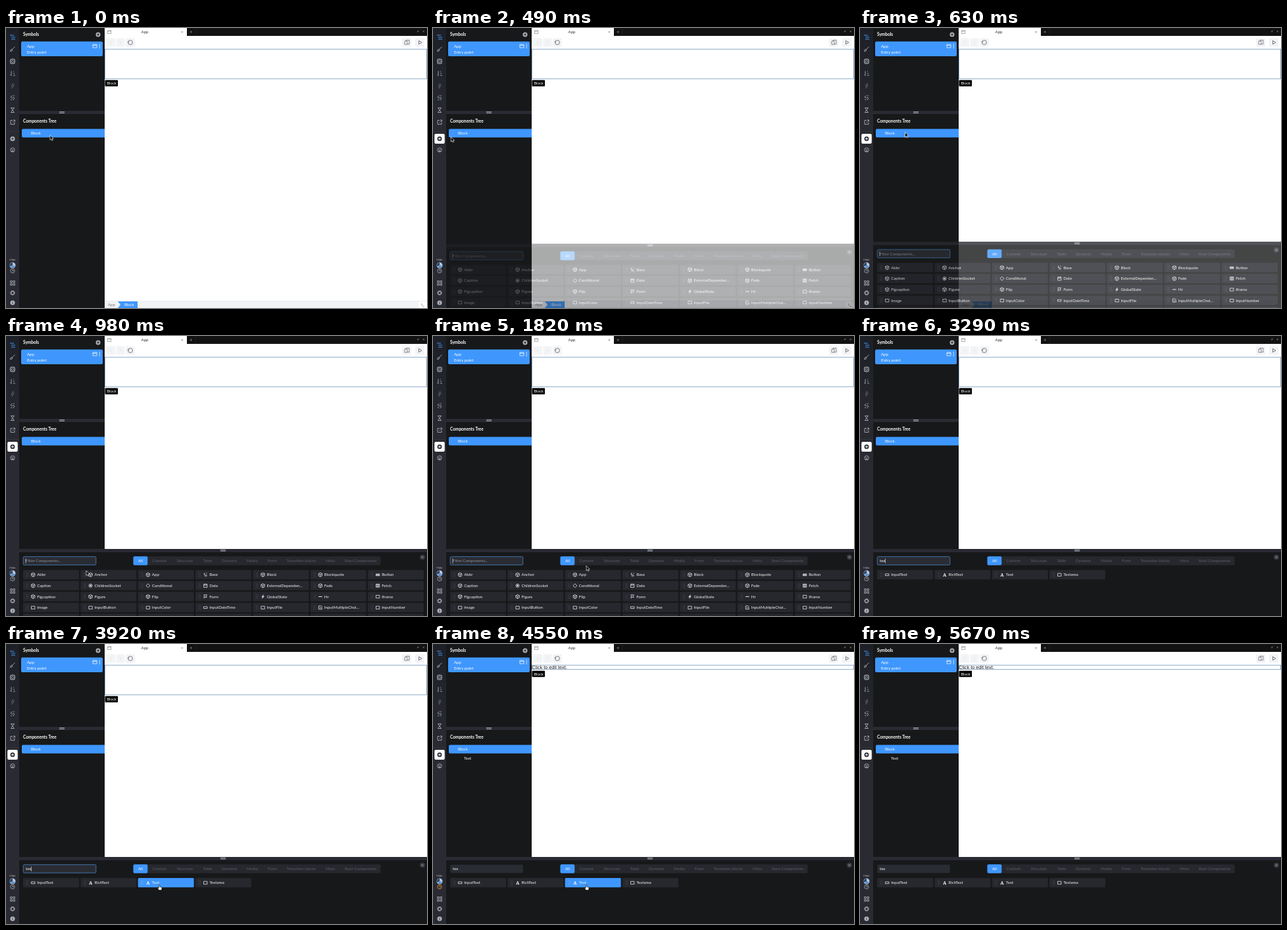
These frames come from a looping animation (640x426 px, 5.88 s). An HTML page:

```html
<!DOCTYPE html>
<html lang="en">
<head>
<meta charset="utf-8">
<title>Component editor</title>
<style>
html, body { margin: 0; height: 100%; overflow: hidden; background: #171819 }
svg { display: block; width: 100vw; height: 100vh }
text { font-family: Lato, "Open Sans", sans-serif; font-size: 6.1px; white-space: pre }
</style>
</head>
<body>
<svg id="stage" viewBox="0 0 640 426">
  <defs>
    <linearGradient id="rail" x2="0" y2="1">
      <stop stop-color="#1e2027"/><stop offset=".38" stop-color="#292a32"/>
    </linearGradient>
  </defs>
  <g id="base"></g><g id="live"></g><g id="panel"></g><g id="pointer"></g>
</svg>
<script>
const LOOP = 5880, STEP = 70, OPEN = 420, DROP = 4340;
const BLUE = '#3f97fd', DARK = '#171819', RAIL = '#292a32', CARD = '#26282e', DIM = '#b2b4bb';
const $ = id => document.getElementById(id);

const rect = (x, y, w, h, fill, r = 0, more = '') =>
  `<rect x="${x}" y="${y}" width="${w}" height="${h}" fill="${fill}" rx="${r}" ${more}/>`;
const text = (x, y, s, fill = '#fff', more = '') => `<text x="${x}" y="${y}" fill="${fill}" ${more}>${s}</text>`;
const line = (d, color = '#d9dade', w = .85, fill = 'none', more = '') =>
  `<path d="${d}" stroke="${color}" stroke-width="${w}" fill="${fill}" stroke-linejoin="round" ${more}/>`;
const disc = (x, y, r, fill, more = '') => `<circle cx="${x}" cy="${y}" r="${r}" fill="${fill}" ${more}/>`;
const ring = (x, y, r, color = '#d9dade', w = .8) => disc(x, y, r, 'none', `stroke="${color}" stroke-width="${w}"`);
const at = (x, y, s) => `<g transform="translate(${x} ${y})">${s}</g>`;
const plus = (x, y, r, fill, ink) => disc(x, y, r, fill) + line(`M${x - 2} ${y}h4M${x} ${y - 2}v4`, ink, .9);
const grip = (x, y) => line(`M${x - 4} ${y - .9}h8M${x - 4} ${y + .9}h8`, DIM, .9);

// icons centred on 0,0
const icon = {
  cube: line('M0-3L2.7-1.6V1.6L0 3L-2.7 1.6V-1.6ZM-2.7-1.6L0-.2L2.7-1.6M0-.2V3'),
  bolt: line('M-1.5-3L-2 0H0L-.6 3M1-3L2.4-1.5M.6 0L2.2 1.2L1 3'),
  target: ring(0, 0, 2.6) + disc(0, 0, 1.5, '#d9dade'),
  diamond: line('M0-3L3 0L0 3L-3 0Z'),
  date: line('M-2.6-2.2H2.6V2.6H-2.6ZM-2.6-.8H2.6M-1.3-3V-2M1.3-3V-2'),
  table: line('M-2.6-2.4H2.6V2.4H-2.6ZM-2.6-1.6H2.6M-2.6 .6H2.6M0-1.6V2.4'),
  box: line('M-2.7-2H2.7V2.2H-2.7Z'),
  wide: line('M-2.8-1.3H2.8V1.4H-2.8Z'),
  button: line('M-2.7-1.2H2.7V1.5H-2.7Z', '#d9dade', .8, '#a5a7ae'),
  form: line('M-2-3V3M-2-2.6H2.4L.8-.9L2.2 .9H-2'),
  state: line('M1-2.8L-2 .4H0L-1 2.8L2-.4H0Z', '#d9dade', .5, '#d9dade'),
  dash: line('M-2.8 0H2.8', '#d9dade', 1.1),
  check: line('M2.5 0V2.5H-2.5V-2.5H1.5M-1.2-.3L0 1L2.8-2'),
  A: text(-2.6, 2.5, 'A', '#fff', 'style="font:bold 7px \'Noto Serif\',serif"')
};

const parts = `Abbr Anchor App Base:bolt Block Blockquote Button:button
Caption ChildrenSocket:target Conditional:diamond Date:date ExternalDependen... Fade Fetch:table
Figcaption Figure Flip Form:form GlobalState:state Hr:dash Iframe:box
Image:box InputButton:box InputColor:box InputDateTime:wide InputFile:box InputMultipleChoi...:check InputNumber:box
InputText:wide List Option RichText:A Select:box Text:A Textarea:box`
  .split(/\s+/).map(s => s.match(/^(.*?)(?::(\w+))?$/).slice(1));

const tabs = [['Content', 222.5], ['Structure', 259.5], ['Table', 299.5], ['Dynamic', 328], ['Media', 366],
  ['Form', 398], ['Transition blocks', 426.5], ['Meta', 486], ['Root Components', 515]];

// pointer stops: time, x, y
const stops = [[0, 67, 163], [70, 67, 163], [280, 11, 168], [420, 13, 168], [630, 68.5, 158.7], [980, 122, 357],
  [1260, 205, 366], [1470, 310, 377], [1820, 233, 349.5], [1960, 233, 349.5], [2030, 300, 348], [2170, 236, 352],
  [3430, 236, 352], [3850, 233, 366.5], [4830, 233, 366.5], [5180, 236, 408]];

function pointerAt(t) {
  const i = stops.findIndex(s => s[0] > t);
  if (i < 0) return stops.at(-1).slice(1);
  const [t0, x0, y0] = stops[i - 1], [t1, x1, y1] = stops[i];
  let u = (t - t0) / (t1 - t0);
  u = u * u * (3 - 2 * u);
  return [x0 + (x1 - x0) * u, y0 + (y1 - y0) * u];
}

function drawBase() {
  const w = DIM;
  const bold = 'style="font-weight:bold;font-size:6.5px"';
  return rect(0, 0, 640, 426, DARK) + rect(0, 0, 20, 426, 'url(#rail)')
    + line('M0 157.5H20', '#3a3c45', .6)
    // rail icons
    + line('M6 11H12M8 14H14M8 17H14', BLUE, 1.1)
    + line('M13.5 28.5L9.5 32.5M9 32L7 33.5L6.5 35.5L9 35L10 33Z', w)
    + line('M7 47.5H13V54H7Z', w) + ring(10, 50.7, 1.6, w) + ring(10, 50.7, 3.8, w, .6)
    + line('M8 65.5V72.5L6.5 71M11 66H12M11 69H13M11 72H14', w)
    + line('M11 84L8 88.5H10L9 92L12.5 87H10.3Z', '#6a6c75', .7)
    + line('M9.5 102.5L7 105L10 107M10 105L13 107L10.5 110M7 109H9M11 103H13', w)
    + line('M7.2 121.5H12.8M7.2 128.5H12.8M8 121.5C8 124 12 126 12 128.5M12 121.5C12 124 8 126 8 128.5', w)
    + line('M10 140.5H7V146.5H13V143.5M9.8 143.8L13.3 140.3M11 140H13.5V142.5', w)
    + ring(10, 185.5, 3.3, w) + line('M8 184.5L10 185.5L12 184.5M10 185.5V188M8 187.5H12', w, .7)
    + text(10, 353.5, 'Hide', w, 'text-anchor="middle" style="font-size:4.6px"')
    + disc(10, 361, 4.5, '#b9c6d8') + line('M10 361V357A4 4 0 0 0 6.2 362.5Z', '#294a70', .3, '#294a70')
    + line('M10 361L13.7 362.5A4 4 0 0 1 7.4 364Z', '#5b93d2', .3, '#5b93d2')
    + line('M6.7 384.7H9.2V387.2H6.7ZM10.9 384.7H13.4V387.2H10.9ZM6.7 388.9H9.2V391.4H6.7ZM10.9 388.9H13.4V391.4H10.9Z', w)
    + ring(10, 403, 2.4, w, 1.1) + disc(10, 403, 3.4, 'none', `stroke="${w}" stroke-width=".9" stroke-dasharray="1.3 1.37"`)
    + disc(10, 418, 3.5, w) + line('M10 417.3V420M10 415.6V416.4', RAIL, 1)
    // side panel
    + text(26, 12.3, 'Symbols', '#fff', bold) + plus(140, 10, 3.5, DIM, DARK)
    + rect(23, 20.4, 124, 22.6, BLUE, 2) + text(32, 30, 'App') + text(32, 38.6, 'Entry point')
    + line('M132 25H138V30H132ZM132 26.4H138', '#fff', .7)
    + [25, 27.5, 30].map(y => disc(142.3, y, .75, '#fff')).join('')
    + rect(20, 126, 130, 5, RAIL) + grip(85, 128.5)
    + text(26, 144.4, 'Components Tree', '#fff', bold)
    + `<path d="M150 153.5H26a2 2 0 0 0-2 2v9a2 2 0 0 0 2 2H150Z" fill="${BLUE}"/>`
    + text(38, 162.2, 'Block')
    // tab bar and toolbar
    + rect(150, 0, 490, 426, '#fff') + rect(275, 0, 365, 12, '#121213')
    + line('M288 0V12', '#2a2a2d', .6)
    + line('M154.5 3.7H159.7V8.5H154.5ZM154.5 5H159.7', '#777', .6)
    + text(211, 8, 'App', '#333', 'text-anchor="middle"')
    + line('M266.5 4.8L269 7.3M269 4.8L266.5 7.3', '#777', .7) + line('M279.5 6H283.1M281.3 4.2V7.8', '#888', .7)
    + line('M625.5 5.5L628 4M626 4V6.5M633.5 4L636 6.5M636 4L633.5 6.5', '#888', .7)
    + [[153, 13], [167.5, 13], [182, 14], [602, 14], [622, 14]].map(([x, n]) => rect(x, 15.5, n, 13, '#f3f4f6', 1.5)).join('')
    + line('M161 19.5L158 22L161 24.5M172.5 19.5L175.5 22L172.5 24.5', '#e4e6e9')
    + ring(189, 22, 3.4, '#5a5c62') + line('M185 20L185.8 22L187.4 20.8', '#5a5c62', .6)
    + line('M606 20H610V25H606ZM608 20V18.5H613V24.5H610', '#5a5c62', .7)
    + line('M627.5 19.3L632 22L627.5 24.7Z', '#5a5c62')
    // breadcrumbs
    + rect(150, 415.5, 490, 10.5, '#f1f3f5') + line('M150 415.5H640', '#dde1e5', .6)
    + text(155, 423.2, 'App', '#777')
    + `<path d="M170 416H200V426H170L174 421Z" fill="${BLUE}"/>` + text(180, 423.2, 'Block')
    + rect(627.5, 416, 12.5, 10, '#fff') + line('M631 419L633 421L631 423M633.5 423.5H636', '#777', .7);
}

function drawLive(t, open) {
  const dropped = t >= DROP, h = dropped ? 6.5 : 45, y = 32.5 + h;
  const clock = dropped && t < 4900 ? '#f09a35' : DIM;
  return (open ? rect(2.2, 161, 15.6, 15, '#fff', 2) + plus(10, 168.5, 3.5, '#33353d', '#fff')
               : plus(10, 168.5, 3.5, DIM, RAIL))
    + disc(10, 369.5, 3.8, RAIL) + ring(10, 369.5, 3.2, clock) + line('M10 367.5V369.7H11.8', clock, .8)
    + rect(150.5, 32.2, 489, h, 'none', 0, 'stroke="#7f9fc3" stroke-width=".9"')
    + rect(150.5, y + 1.7, 19.6, 9.6, '#000', 1) + text(153.2, y + 8.6, 'Block')
    + (dropped ? text(47, 176, 'Text')
      + text(150.3, 38.1, 'Click to edit text.', '#222', 'style="font:7.3px \'Liberation Sans\',sans-serif"') : '');
}

const cardBox = i => [26 + i % 7 * 87.33, 356 + Math.floor(i / 7) * 16.65];
const inCard = (i, [x, y]) => {
  const [cx, cy] = cardBox(i);
  return x > cx && x < cx + 85 && y > cy + 2 && y < cy + 13;
};

function drawPanel(t, query, cards, hot) {
  const focus = t < DROP, caret = 30 + [0, 2.4, 5.4, 8.4][query.length];
  return rect(20, 324, 620, 102, DARK) + rect(20, 324, 620, 5, RAIL) + grip(330, 326.3)
    + rect(26.2, 335.7, 110.6, 12.6, '#2a2c33', 1.5, focus ? 'stroke="#4a86c8" stroke-width=".8"' : '')
    + text(30, 344.2, query || 'Filter Components...', query ? '#fff' : '#8b8d95')
    + (focus ? line(`M${caret} 338.5V345.8`, '#fff', .6) : '')
    + rect(193.5, 335.3, 376, 13.4, CARD, 2) + rect(193.5, 335.3, 21.8, 13.4, BLUE, 2) + text(201, 344.2, 'All')
    + tabs.map(([s, x]) => text(x, 344.2, s, '#5b5d66')).join('')
    + disc(633, 336.5, 4, '#34363e') + line('M631.3 334.8L634.7 338.2M634.7 334.8L631.3 338.2', DIM, .7)
    + cards.map(([name, kind = 'cube'], i) => at(...cardBox(i),
      rect(0, 0, 85, 14.2, i === hot ? BLUE : CARD, 1.5)
      + line('M5.3 4.2V10.2M7.3 4.2V10.2', i === hot ? '#86bdfd' : '#565861', .8, 'none', 'stroke-dasharray="1 1.5"')
      + at(15.2, 7.2, icon[kind]) + text(21.2, 9.3, name, i === hot ? '#e4f0ff' : '#f2f2f4'))).join('');
}

const arrow = '<path d="M0 0V7.4L1.7 5.9L2.8 8.3L4.1 7.7L3 5.4H5.2Z" fill="#000" stroke="#fff" stroke-width=".65"/>';
const hand = '<path d="M-.8 .3Q0-.6 .8 .3V3L3.6 3.7Q4.3 4 4 5.2L3.3 8H-.4L-2.4 5.2Q-2.3 4.1-.8 5Z" fill="#fff" stroke="#000" stroke-width=".6"/>';

function draw(t) {
  const u = Math.min(1, Math.max(0, (t - OPEN) / 500)), ease = 1 - (1 - u) ** 3;
  const query = 'tex'.slice(0, [2520, 2730, 3010].filter(k => t >= k).length);
  const cards = parts.filter(p => p[0].toLowerCase().includes(query));
  const spot = pointerAt(t), shown = t < 2520 || t >= 3430 && t < 5250;
  const hot = shown && t > OPEN ? cards.findIndex((_, i) => inCard(i, spot)) : -1;
  $('live').innerHTML = drawLive(t, t >= OPEN - STEP);
  $('panel').innerHTML = u ? drawPanel(t, query, cards, hot) : '';
  $('panel').setAttribute('opacity', ease);
  $('panel').setAttribute('transform', `translate(0 ${7 * (1 - ease)})`);
  $('pointer').innerHTML = shown ? at(...spot, hot < 0 ? arrow : hand) : '';
}

$('base').innerHTML = drawBase();
const start = performance.now();
let last = -1;
function tick() {
  const t = Math.floor((performance.now() - start) % LOOP / STEP) * STEP;
  if (t !== last) draw(last = t);
  requestAnimationFrame(tick);
}
tick();
</script>
</body>
</html>
```
